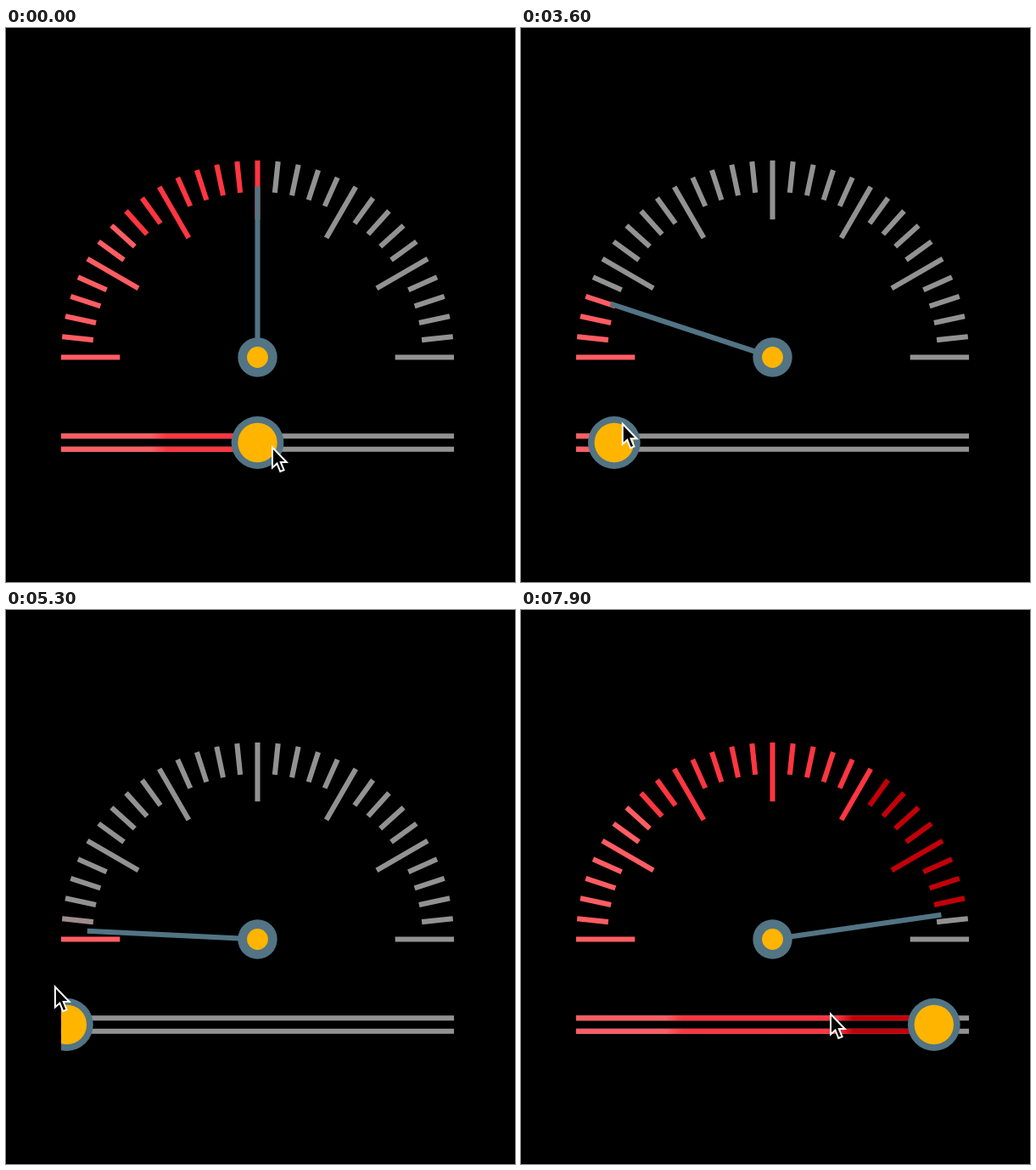
Animation, 600 px wide and 652 px high, one loop 8 s. Source, as an HTML page with a canvas:

```html
<!DOCTYPE html>
<html lang="en">
<head>
<meta charset="utf-8">
<title>Gauge</title>
<style>
  html, body { margin: 0; width: 100%; height: 100%; overflow: hidden; background: #000; }
  canvas { display: block; }
</style>
</head>
<body>
<canvas width="600" height="652"></canvas>
<script>
const ctx = document.querySelector('canvas').getContext('2d');
const LOOP = 8000, STEP = 100, GRAB = 200;
const CX = 296.5, CY = 387.5, RADIUS = 231.6, LINE = 6.1;
const LEFT = CX - RADIUS, RIGHT = CX + RADIUS, THUMB_Y = 488;
const GRAY = '#929292', LIGHT = '#ff5d63', BRIGHT = '#ff3640', DARK = '#c20008';
const STEEL = '#527484', AMBER = '#ffb400';

// Turning points of the drag: [time, needle angle from vertical]
const swings = [
  [GRAB, 0], [750, 30], [2920, -90], [3300, -90], [4755, 90], [5347, -90], [5400, -90], [6800, 81.8]
];
// Turning points of the hand: [time, x, y]
const hand = [
  [0, 313, 491], [750, 345, 489], [2900, 66, 475], [3250, 53, 465],
  [4660, 508, 453], [5340, 53, 441], [6800, 495, 456], [7200, 495, 460], [7800, 364, 473]
];

// Cosine easing from one turning point to the next, holding at both ends
function ease(keys, t, col = 1) {
  const next = keys.findIndex(k => k[0] > t);
  if (next < 1) return keys.at(next)[col];
  const a = keys[next - 1], b = keys[next];
  const u = (t - a[0]) / (b[0] - a[0]);
  return a[col] + (b[col] - a[col]) * (1 - Math.cos(Math.PI * u)) / 2;
}

function line(x1, y1, x2, y2, color) {
  ctx.strokeStyle = color;
  ctx.lineWidth = LINE;
  ctx.beginPath();
  ctx.moveTo(x1, y1);
  ctx.lineTo(x2, y2);
  ctx.stroke();
}

function disc(x, y, r, color) {
  ctx.fillStyle = color;
  ctx.beginPath();
  ctx.arc(x, y, r, 0, 2 * Math.PI);
  ctx.fill();
}

function spoke(deg, from, to, color, alpha = 1) {
  ctx.save();
  ctx.globalAlpha = alpha;
  ctx.translate(CX, CY);
  ctx.rotate(deg * Math.PI / 180);
  line(0, -from, 0, -to, color);
  ctx.restore();
}

// A tick that has just gone out keeps a faint glow
function drawTicks(angle, before) {
  for (let i = 0; i <= 30; i++) {
    const deg = i * 6 - 90, inner = i % 5 ? 194.7 : 162.2;
    const color = i < 8 ? LIGHT : i < 21 ? BRIGHT : DARK;
    const lit = deg <= angle ? 1 : deg <= before ? 0.12 : 0;
    if (lit < 1) spoke(deg, inner, RADIUS, GRAY);
    if (lit) spoke(deg, inner, RADIUS, color, lit);
  }
}

const trackFill = ctx.createLinearGradient(LEFT, 0, RIGHT, 0);
[LIGHT, BRIGHT, DARK].forEach((color, i) => {
  const edge = [0, 0.25, 0.685, 1], blur = 0.02;
  trackFill.addColorStop(Math.max(0, edge[i] + blur), color);
  trackFill.addColorStop(Math.min(1, edge[i + 1] - blur), color);
});

function drawSlider(x) {
  for (const y of [THUMB_Y - 7.7, THUMB_Y + 7.7]) {
    line(LEFT, y, RIGHT, y, GRAY);
    line(LEFT, y, x, y, trackFill);
  }
  ctx.save();
  ctx.beginPath();
  ctx.rect(LEFT, 440, RIGHT - LEFT, 100);
  ctx.clip();
  disc(x, THUMB_Y, 30.9, STEEL);
  disc(x, THUMB_Y, 23.2, AMBER);
  ctx.restore();
}

const arrow = new Path2D('M1 2.5V26.5L6.5 21.5L10.3 31L14.6 29.2L10.8 20H17.8Z');

function drawPointer(x, y) {
  ctx.save();
  ctx.translate(x, y);
  ctx.fillStyle = '#000';
  ctx.strokeStyle = '#fff';
  ctx.lineWidth = 2;
  ctx.fill(arrow);
  ctx.stroke(arrow);
  ctx.restore();
}

function draw(t) {
  const angle = ease(swings, t);
  // The knob sits centred until it is grabbed
  const thumbX = t < GRAB ? CX : 286 + 2.455 * angle;

  ctx.fillStyle = '#000';
  ctx.fillRect(0, 0, 600, 652);
  drawTicks(angle, ease(swings, t - STEP / 2));
  spoke(angle, 0, 201, STEEL);
  disc(CX, CY, 23.2, STEEL);
  disc(CX, CY, 12.4, AMBER);
  drawSlider(thumbX);
  drawPointer(ease(hand, t), ease(hand, t, 2));
}

const start = performance.now();
function frame() {
  const t = (performance.now() - start) % LOOP;
  draw(Math.floor(t / STEP) * STEP);
  requestAnimationFrame(frame);
}
frame();
</script>
</body>
</html>
```
